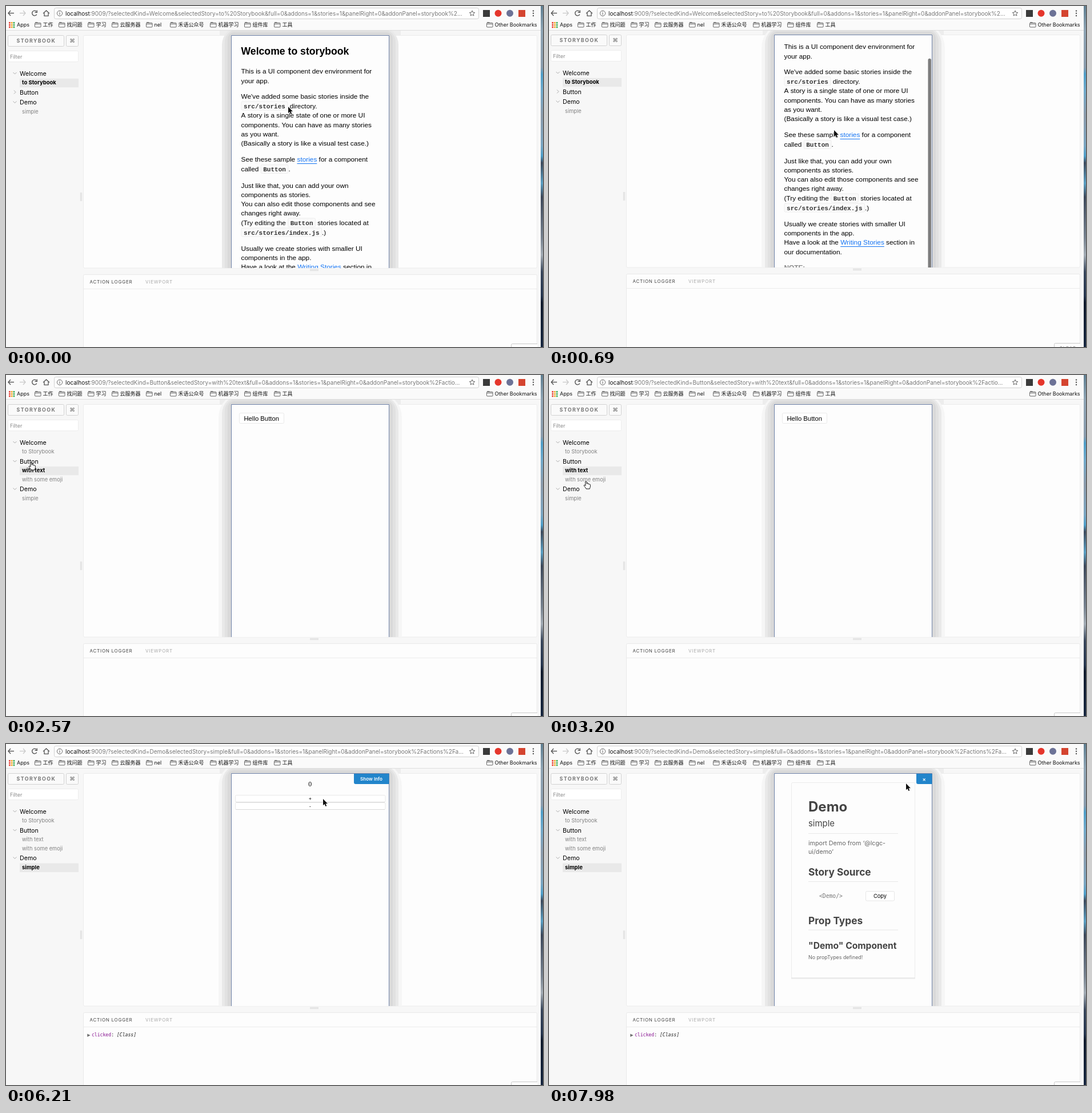
An HTML page with a canvas that plays this animation: 940x596 px, repeating every 8000 ms.

```html
<!DOCTYPE html>
<html lang="en">
<head>
<meta charset="utf-8">
<title>Component explorer</title>
<style>
html, body { margin: 0; width: 100%; height: 100%; overflow: hidden; background: #f7f7f7; }
canvas { display: block; }
</style>
</head>
<body>
<canvas id="stage" width="940" height="596"></canvas>
<script>
const ctx = document.getElementById('stage').getContext('2d');
const LOOP = 8000;
const UI = 'Inter, sans-serif';
const SANS = '"Liberation Sans", sans-serif';
const BODY = '11.84px ' + SANS;
const MONO = '"Liberation Mono", monospace';
const MENLO = '"DejaVu Sans Mono", monospace';
const CJK = '"Noto Sans CJK SC", "Noto Sans CJK", sans-serif';

const BURSTS = [[0, 0, 1], [150, 690, 4], [920, 920, 1], [1430, 1430, 1], [1700, 1940, 2],
  [2270, 3200, 7], [3500, 4410, 7], [4560, 5590, 8], [5740, 6660, 7], [6800, 7830, 8], [7980, 7980, 1]];
const STEPS = BURSTS.flatMap(([a, b, n]) =>
  Array.from({ length: n }, (_, i) => n > 1 ? a + (b - a) * i / (n - 1) : a));

// Pointer way points: [time, x, y]
const PATH = [[0, 494, 176], [690, 499, 217], [920, 499, 217], [1430, 157, 224], [1700, 90, 185],
  [1940, 55, 160], [2270, 44, 153], [2580, 44, 153], [3200, 65, 186], [3660, 65, 185],
  [4250, 430, 78], [4410, 430, 78], [4850, 75, 250], [5000, 57, 233], [5290, 42, 213],
  [5740, 40, 211], [6200, 555, 96], [6660, 555, 96], [6800, 546, 108], [6950, 546, 108],
  [7240, 634, 60], [7830, 633, 61], [7980, 625, 69]];

const STORIES = {
  welcome: { label: 'to Storybook', query: 'Welcome&selectedStory=to%20Storybook', tail: 'storybook%2...' },
  text: { label: 'with text', query: 'Button&selectedStory=with%20text', tail: 'storybook%2Factio...' },
  emoji: { label: 'with some emoji', query: 'Button&selectedStory=with%20some%20emoji', tail: 'storyboo...' },
  demo: { label: 'simple', query: 'Demo&selectedStory=simple', tail: 'storybook%2Factions%2Fa...' }
};

// Baseline and text; `code` and [link] are inline styles
const WELCOME = [
  [118, 'This is a UI component dev environment for'], [134.5, 'your app.'],
  [162, "We've added some basic stories inside the"], [178.5, '`src/stories` directory.'],
  [195, 'A story is a single state of one or more UI'],
  [211.5, 'components. You can have as many stories'], [227.5, 'as you want.'],
  [244, '(Basically a story is like a visual test case.)'],
  [272, 'See these sample [stories] for a component'], [289, 'called `Button`.'],
  [317.5, 'Just like that, you can add your own'], [333.5, 'components as stories.'],
  [349.5, 'You can also edit those components and see'], [366, 'changes right away.'],
  [382.5, '(Try editing the `Button` stories located at'], [399.5, '`src/stories/index.js`.)'],
  [428, 'Usually we create stories with smaller UI'], [444, 'components in the app.'],
  [460, 'Have a look at the [Writing Stories] section in'], [476.5, 'our documentation.']];

function text(str, x, y, font, color, align = 'left', spacing = 0) {
  ctx.font = font;
  ctx.fillStyle = color;
  ctx.textAlign = align;
  ctx.letterSpacing = spacing + 'px';
  ctx.fillText(str, x, y);
  const width = ctx.measureText(str).width;
  ctx.letterSpacing = '0px';
  return width;
}

function rect(x, y, w, h, color) {
  ctx.fillStyle = color;
  ctx.fillRect(x, y, w, h);
}

function box(x, y, w, h, r, fill, stroke, lineWidth = 1) {
  ctx.beginPath();
  ctx.roundRect(x, y, w, h, r);
  if (fill) { ctx.fillStyle = fill; ctx.fill(); }
  if (stroke) { ctx.strokeStyle = stroke; ctx.lineWidth = lineWidth; ctx.stroke(); }
}

function disc(x, y, r, color) {
  ctx.beginPath();
  ctx.arc(x, y, r, 0, 7);
  ctx.fillStyle = color;
  ctx.fill();
}

function line(points, color, lineWidth = 1) {
  ctx.beginPath();
  points.forEach(([x, y]) => ctx.lineTo(x, y));
  ctx.strokeStyle = color;
  ctx.lineWidth = lineWidth;
  ctx.stroke();
}

function arc(x, y, r, from, to, color, lineWidth = 1) {
  ctx.beginPath();
  ctx.arc(x, y, r, from, to);
  ctx.strokeStyle = color;
  ctx.lineWidth = lineWidth;
  ctx.stroke();
}

function clipped(x, y, w, h, draw) {
  ctx.save();
  ctx.beginPath();
  ctx.rect(x, y, w, h);
  ctx.clip();
  draw();
  ctx.restore();
}

function pointer(t) {
  const i = Math.max(1, PATH.findIndex(p => p[0] >= t));
  const [t0, x0, y0] = PATH[i - 1], [t1, x1, y1] = PATH[i];
  const k = (t - t0) / (t1 - t0);
  return [x0 + (x1 - x0) * k, y0 + (y1 - y0) * k];
}

function stateAt(t) {
  return {
    t,
    story: t < 2420 ? 'welcome' : t < 3650 ? 'text' : t < 5430 ? 'emoji' : 'demo',
    open: t >= 2420,
    shift: t >= 150 && t < 1430 ? 1 : 0,
    scroll: t < 1430 ? 42 * Math.min(1, t / 690) : 0,
    bar: t < 150 ? 0 : t < 1700 ? 1 : t < 1940 ? 0.5 : 0,
    clicked: t >= 4250,
    count: t < 6350 ? 0 : t < 6500 ? 1 : t < 6940 ? 2 : 1,
    info: t >= 7380,
    hand: (t >= 1940 && t < 3700) || (t >= 5280 && t < 5800) || (t >= 7230 && t < 7500)
  };
}

function folder(x, label, font) {
  box(x + 0.5, 29.5, 10.5, 7.5, 1, null, '#666');
  line([[x + 0.5, 31.5], [x + 11, 31.5]], '#666');
  rect(x + 1, 28.2, 4.5, 1.4, '#666');
  text(label, x + 14.5, 36.3, font, '#111');
}

function browser(s) {
  rect(0, 0, 936, 43, '#fafafa');
  rect(0, 42, 936, 1, '#dedede');
  const arrow = (x, dir, color) => {
    line([[x - 5, 12.5], [x + 5, 12.5]], color, 1.4);
    line([[x + dir, 8], [x + dir * 5, 12.5], [x + dir, 17]], color, 1.4);
  };
  arrow(9, -1, '#555');
  arrow(29, 1, '#ccc');
  arc(50, 12.5, 4.3, 0.5, 5.5, '#555', 1.4);
  line([[54.3, 7.5], [54.3, 11.3], [50.5, 11.3]], '#555', 1.4);
  line([[65, 13], [70.5, 8], [76, 13]], '#555', 1.3);
  line([[67, 12], [67, 17.3], [74, 17.3], [74, 12]], '#555', 1.3);

  box(84.5, 3.5, 743, 19, 3, '#fff', '#cfcfcf');
  arc(94, 12.8, 4.6, 0, 7, '#666');
  rect(93.5, 12, 1.1, 3.4, '#666');
  rect(93.5, 10, 1.1, 1.2, '#666');
  const story = STORIES[s.story];
  const host = text('localhost', 104, 16.5, '10px ' + UI, '#111');
  text(`:9009/?selectedKind=${story.query}&full=0&addons=1&stories=1&panelRight=0&addonPanel=${story.tail}`,
    104 + host, 16.5, '10px ' + UI, '#777');
  const star = Array.from({ length: 11 }, (_, i) => {
    const a = i * Math.PI / 5 - Math.PI / 2, r = i % 2 ? 2.3 : 5;
    return [816 + r * Math.cos(a), 13 + r * Math.sin(a)];
  });
  line(star, '#666');

  rect(835, 7, 12, 12, '#3a3a3a');
  disc(861.5, 12.8, 6, '#e5352b');
  disc(882, 12.8, 6, '#6c7296');
  rect(897, 7, 12, 12, '#d4442f');
  [8.5, 12.8, 17].forEach(y => disc(923, y, 1.2, '#555'));

  const dots = ['#e8453c', '#f2a623', '#3cae5a', '#3f84e8'];
  for (let i = 0; i < 9; i++)
    rect(5 + i % 3 * 3.8, 28 + Math.floor(i / 3) * 3.8, 2.7, 2.7, dots[(i + Math.floor(i / 3)) % 4]);
  text('Apps', 19, 36.3, '9px ' + UI, '#111');
  [[50, '工作'], [92, '找问题'], [143, '学习'], [185, '云服务器'], [287, '禾语公众号'],
    [357, '机器学习'], [417, '组件库'], [469, '工具']].forEach(([x, label]) => folder(x, label, '9px ' + CJK));
  folder(245, 'nel', '9px ' + UI);
  folder(841, 'Other Bookmarks', '9px ' + UI);
}

function desktop() {
  const g = ctx.createLinearGradient(0, 0, 0, 596);
  [[0, '#5f7f92'], [0.07, '#8ea4b4'], [0.18, '#8a9cad'], [0.2, '#4f9fc9'], [0.25, '#71aacb'], [0.32, '#8c9bab'],
    [0.41, '#7aa6c2'], [0.44, '#4d9fca'], [0.46, '#3d4a5c'], [0.52, '#5aa0c4'], [0.56, '#3c485a'],
    [0.68, '#77828f'], [0.73, '#a4adb5'], [0.78, '#38465b'], [0.85, '#26364f'], [0.87, '#0f1a2c'], [1, '#16263f']]
    .forEach(([at, color]) => g.addColorStop(at, color));
  rect(936, 0, 4, 596, g);
}

function chevron(x, y, open) {
  line(open ? [[x - 3, y - 1.5], [x, y + 1.5], [x + 3, y - 1.5]]
    : [[x - 1.5, y - 3], [x + 1.5, y], [x - 1.5, y + 3]], '#aaa');
}

function sidebar(s) {
  box(3.5, 51.5, 98, 19, 2, '#fafafa', '#d2d2d2');
  text('STORYBOOK', 18.5, 64.2, 'bold 8.8px ' + UI, '#777', 'left', 1.45);
  box(105.5, 51.5, 21, 19, 2, '#fafafa', '#d2d2d2');
  text('⌘', 116, 64.2, '9.5px "DejaVu Sans", sans-serif', '#666', 'center');
  box(3.5, 78.5, 123, 19, 2, '#fff', '#ececec');
  text('Filter', 7, 92, '9px ' + UI, '#8a8a8a');

  const kind = (label, y, open) => {
    chevron(15.5, y, open);
    text(label, 24, y + 4, '10.65px ' + UI, '#000');
  };
  const item = (id, y) => {
    const active = s.story === id;
    if (active) rect(24, y - 7.2, 103, 15.4, '#e9e9e9');
    text(STORIES[id].label, 28, y + 3.4, (active ? 'bold 9.5px ' : '9.3px ') + UI, active ? '#000' : '#828282');
  };
  const drop = s.open ? 31 : 0;
  kind('Welcome', 117.5, true);
  item('welcome', 134);
  kind('Button', 150.5, s.open);
  if (s.open) { item('text', 167); item('emoji', 182.7); }
  kind('Demo', 168 + drop, true);
  item('demo', 184.7 + drop);
}

function panels(s) {
  rect(130, 326, 1, 15, '#d8d8d8');
  rect(132, 326, 1, 15, '#d8d8d8');
  rect(532, 460, 15, 1, '#d8d8d8');
  rect(532, 462, 15, 1, '#d8d8d8');
  box(135.5, 51.5, 794, 406.5, 2, '#fdfdfd', '#ececec');
  box(135.5, 469.5, 794, 140, 2, '#fdfdfd', '#e9e9e9');
  rect(136, 494, 793, 1, '#ebebeb');
  text('ACTION LOGGER', 146.5, 485, '8px ' + UI, '#444', 'left', 0.75);
  text('VIEWPORT', 244, 485, '8px ' + UI, '#aaa', 'left', 0.75);
  clipped(880, 560, 50, 50, () => {
    box(884.5, 590.5, 48, 20, 2, '#fff', '#c8c8c8');
    text('CLEAR', 908, 602, '8px ' + UI, '#777', 'center', 0.75);
  });
  if (s.clicked) {
    text('▶', 142.3, 511, '7px "DejaVu Sans", sans-serif', '#6e6e6e');
    text('clicked', 150, 511, '8.1px ' + MENLO, '#881391');
    text(':', 184.2, 511, '8.1px ' + MENLO, '#222');
    text('[Class]', 194, 511, 'italic 8.1px ' + MENLO, '#222');
  }
}

function phone(s) {
  clipped(136, 43, 793, 415, () => {
    rect(374, 43, 317, 8, '#ededed');
    const rings = [[22, '#f6f6f6'], [16, '#e9e9e9'], [11, '#e1e1e1'], [6, '#d9d9d9']];
    rings.slice(s.t < 150 ? 1 : 0).forEach(([d, color]) =>
      box(394 - d, 52 - d, 277 + 2 * d, 520, 2 * d, color));
    box(394.5, 51.5, 276, 500, 0, '#fdfdfd', '#6f82a8');
  });
  clipped(395, 52, 275.5, 406, () => VIEWS[s.story](s));
}

function richLine(str, x, y) {
  for (const part of str.split(/(`.*?`|\[.*?\])/).filter(Boolean)) {
    const inner = part.slice(1, -1);
    if (part[0] === '`') {
      ctx.font = 'bold 11.05px ' + MONO;
      const w = ctx.measureText(inner).width + 9;
      box(x + 0.5, y - 11.5, w - 1, 15, 2, '#fafafa', '#ededed');
      text(inner, x + 4.5, y, ctx.font, '#333');
      x += w;
    } else if (part[0] === '[') {
      const w = text(inner, x, y, BODY, '#1474f3');
      rect(x, y + 3, w, 1, '#1474f3');
      x += w;
    } else {
      x += text(part, x, y, BODY, '#000');
    }
  }
}

function emojis() {
  const y = 77.5;
  [421.5, 439].forEach(x => disc(x, y, 5.4, '#fbc53a'));
  disc(419.6, y - 1.4, 0.9, '#5b3a12');
  disc(423.4, y - 1.4, 0.9, '#5b3a12');
  ctx.beginPath();
  ctx.arc(421.5, y + 0.7, 3.3, 0, Math.PI);
  ctx.fillStyle = '#7a3d14';
  ctx.fill();
  rect(419, y + 0.9, 5, 1, '#fff');
  box(433.9, y - 3, 4.6, 3.3, [0, 0, 2, 2], '#222');
  box(439.5, y - 3, 4.6, 3.3, [0, 0, 2, 2], '#222');
  rect(434, y - 3, 10, 1, '#222');
  arc(439, y + 1, 2.2, 0.3, 2.8, '#7a3d14');
  box(453.5, y - 0.8, 8, 6, 2, '#fbc02d');
  line([[456, y + 1], [457.5, y - 1.5], [457, y - 4.5]], '#fbc02d', 2.6);
  rect(452, y, 2, 5, '#e9a51f');
  ctx.save();
  ctx.translate(474.5, y);
  ctx.rotate(-0.15);
  text('100', 0, 1.6, 'italic bold 6.5px ' + SANS, '#d5202c', 'center');
  line([[-4.5, 3.3], [4.5, 2.7]], '#d5202c');
  line([[-3, 5], [3, 4.5]], '#d5202c');
  ctx.restore();
}

function infoCard() {
  const rule = y => rect(454, y, 157, 1, '#e8e8e8');
  const heading = (str, y, size) => text(str, 454, y, `bold ${size}px ${UI}`, '#444');
  rect(424, 408, 217, 2.5, '#e8e8e8');
  box(424.5, 67.5, 216, 341, 2, '#fdfdfd', '#ececec');
  heading('Demo', 118, 24);
  text('simple', 454, 143.5, '14.9px ' + UI, '#444');
  rule(156);
  text('import Demo from ‘@lcgc-', 454, 176.5, '10.75px ' + UI, '#666');
  text('ui/demo’', 454, 191.7, '10.75px ' + UI, '#666');
  heading('Story Source', 230.3, 17.3);
  rule(240);
  text('<Demo/>', 473, 269, '9.7px ' + MENLO, '#777');
  box(554.5, 257.5, 50, 16.5, 2, '#fff', '#e6e6e6');
  text('Copy', 579.5, 269.2, '9.3px ' + UI, '#000', 'center');
  heading('Prop Types', 314.7, 17.3);
  rule(324.5);
  heading('"Demo" Component', 358, 15.65);
  text('No propTypes defined!', 454, 375.6, '8.85px ' + UI, '#666');
}

const VIEWS = {
  welcome(s) {
    ctx.save();
    ctx.translate(0, -s.scroll);
    text('Welcome to storybook', 411.5, 85.3, 'bold 17.65px ' + SANS, '#000');
    WELCOME.forEach(([y, str]) => richLine(str, 411.5, y));
    text('NOTE:', 411.5, 503.5, 'bold ' + BODY, '#888');
    ctx.restore();
    ctx.globalAlpha = s.bar;
    box(663.5, 54 + s.scroll * 0.92, 5.5, 440, 2.8, '#7d7d7d');
    ctx.globalAlpha = 1;
  },
  text() {
    box(408.5, 66.5, 78, 18, 2, '#fff', '#e9e9e9');
    text('Hello Button', 447.2, 79.5, '11.3px ' + SANS, '#000', 'center');
  },
  emoji(s) {
    if (s.clicked) box(406.2, 64.2, 87.3, 27, 2, '#fff', '#8fc3f8', 2.6);
    else box(408.5, 66.5, 82.5, 22.5, 2, '#fff', '#e9e9e9');
    emojis();
  },
  demo(s) {
    if (s.info) {
      infoCard();
    } else {
      text(s.count, 532.3, 74.3, '11.8px "Liberation Serif", serif', '#000', 'center');
      [['+', 89.5], ['-', 102.5]].forEach(([sign, y]) => {
        box(401.5, y, 262.5, 12, 2, '#fff', '#e8e8e8');
        rect(402.5, y + 11.5, 260.5, 1, '#d9d9d9');
        text(sign, 532.3, y + 9.3, '8.2px ' + SANS, '#000', 'center');
      });
    }
    const x = s.info ? 643 : 609;
    box(x, 52, 671 - x, 18, [0, 0, 0, 3], '#2285cb');
    if (s.info) text('×', 656.7, 64.5, '600 9.5px ' + UI, '#fff', 'center');
    else text('Show Info', 639.5, 64, '600 8.1px ' + UI, '#fff', 'center');
  }
};

const ARROW = new Path2D('M0 0V11.3L2.6 9L4.4 13L6.3 12.2L4.6 8.3H8Z');
const HAND = new Path2D('M-1.4 .9C-1.4-.5 .7-.5 .9 .9L1.3 4.3C2-.2 3.4 3.6 3.6 5C4.2 3.7 5.5 4 5.7 5.4' +
  'C6.5 4.6 7.4 5 7.4 6.3V8.8C7.4 10.5 6.3 11 6.2 13H0C-.3 11-3.8 8.6-3.8 7C-3.6 5.7-2 6-1 7.5Z');

function cursor(s) {
  const [x, y] = pointer(s.t);
  ctx.save();
  ctx.translate(x, y);
  ctx.lineJoin = 'round';
  ctx.lineWidth = s.hand ? 1 : 1.4;
  ctx.strokeStyle = s.hand ? '#111' : '#fff';
  ctx.fillStyle = s.hand ? '#fff' : '#111';
  const shape = s.hand ? HAND : ARROW;
  if (s.hand) { ctx.fill(shape); ctx.stroke(shape); }
  else { ctx.stroke(shape); ctx.fill(shape); }
  ctx.restore();
}

function frame(now) {
  const time = now % LOOP;
  const s = stateAt(STEPS.filter(step => step <= time + 3).pop());
  rect(0, 0, 940, 596, '#f7f7f7');
  clipped(0, 43, 936, 553, () => {
    ctx.translate(0, -s.shift);
    sidebar(s);
    panels(s);
    phone(s);
  });
  browser(s);
  desktop();
  cursor(s);
  requestAnimationFrame(frame);
}
requestAnimationFrame(frame);
</script>
</body>
</html>
```
